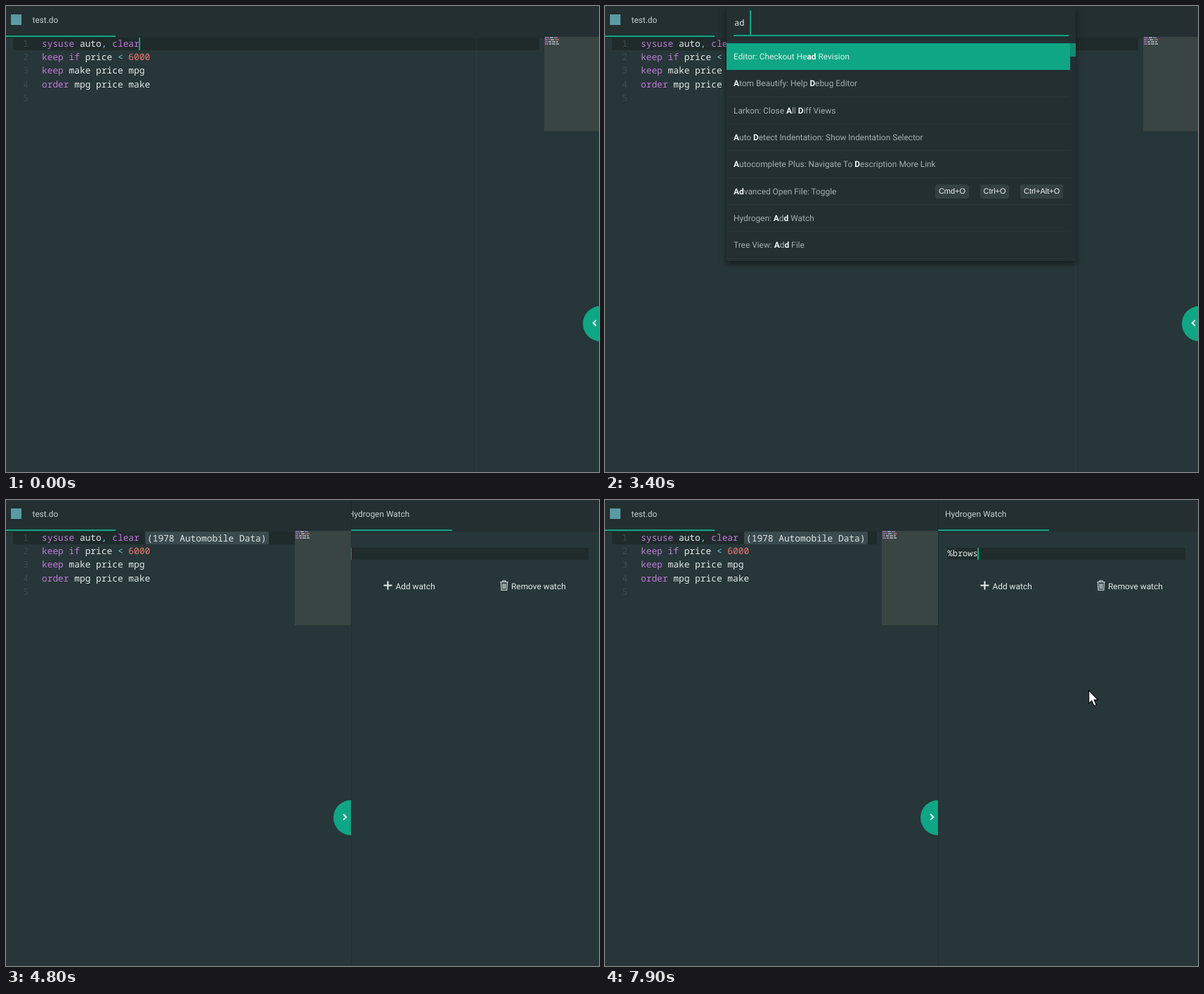
Animation, 844 px wide and 663 px high, one loop 8 s. Source, as an HTML page:

```html
<!DOCTYPE html>
<html lang="en">
<head>
<meta charset="utf-8">
<title>Editor session</title>
<style>
  :root { --bg: #273638; --bar: #232f31; --accent: #0ea685; --line: #1f2a2b; }
  html, body { margin: 0; width: 100%; height: 100%; overflow: hidden; background: var(--bg); }
  #stage { position: relative; width: 844px; height: 663px; overflow: hidden; background: var(--bg);
    font: 11.9px Roboto, sans-serif; color: #c6cfcf; text-rendering: geometricPrecision; }
  #stage div, #stage svg { position: absolute; }
  .mono { font-family: "Noto Sans Mono", monospace; font-size: 12px; white-space: pre; }
  .bar { left: 0; top: 0; width: 100%; height: 44px; background: var(--bar); box-shadow: 0 1px 2px rgba(0,0,0,.18); }
  .title { top: 0; line-height: 40px; white-space: nowrap; }
  .under { top: 42px; height: 2px; background: var(--accent); }
  .caret { width: 2px; background: var(--accent); }

  #editor { left: 0; top: 0; height: 663px; overflow: hidden; }
  #icon { left: 7px; top: 12px; width: 15px; height: 15px; background: #5a9aa3; }
  #current { left: 10px; top: 45px; height: 18px; background: var(--line); }
  #guide { left: 669px; top: 44px; width: 1px; height: 619px; background: rgba(255,255,255,.035); }
  .code { left: 51px; font-size: 12.85px; line-height: 19.2px; color: #e5ebea; }
  .num { left: 10px; width: 22px; text-align: right; font-size: 12.85px; line-height: 19.2px; color: #3c4b4e; }
  .k { color: #c07bd9; } .o { color: #62d5dc; } .n { color: #f0786b; }
  #bubble { left: 197.5px; top: 44.5px; width: 176.5px; height: 18.5px; border-radius: 2px; background: #3b4a4e;
    font-size: 12.85px; line-height: 18.5px; text-align: center; color: #e0e6e6; }
  #map { top: 44px; right: 0; width: 80px; height: 134px; background: #394543; }
  #map div { height: 2px; background: currentColor; opacity: .65; }
  #toggle { right: -25px; top: 427px; width: 50px; height: 50px; border-radius: 50%; background: var(--accent); }
  #chevron { right: 5px; top: 446px; }

  #dock { top: 0; right: 0; height: 663px; overflow: hidden; background: var(--bg); }
  #edge { left: 0; top: 0; width: 1px; height: 663px; background: rgba(0,0,0,.12); }
  #pane { top: 0; width: 370px; height: 663px; }
  #field { left: 13px; top: 67.5px; width: 339px; height: 17.5px; background: #202b2c; }
  #watch { left: 13.5px; top: 67px; line-height: 18px; color: #e5ebea; }
  #hover { left: 10px; top: 110px; width: 176px; height: 27px; background: var(--bg); box-shadow: 0 2px 4px rgba(0,0,0,.4); }
  .label { top: 113px; line-height: 20px; color: #e5ebea; white-space: nowrap; }

  #palette { left: 173px; top: 0; width: 497px; max-height: 363px; overflow: hidden; background: var(--bar); }
  #drop { left: 173px; top: 0; width: 497px; box-shadow: 0 4px 8px rgba(0,0,0,.5); }
  #stage #list { position: relative; margin-top: 53.2px; }
  #stage .row { position: relative; height: 38.3px; line-height: 38.3px; padding-left: 10px; box-sizing: border-box;
    border-bottom: 1px solid #2a3739; color: #a4afaf; white-space: nowrap; }
  .row b { color: #f3f7f7; font-weight: 700; }
  #stage .row:first-child { background: var(--accent); color: #d9f0ea; border-color: var(--accent); }
  #stage .keys { right: 10px; top: 9px; display: flex; gap: 16px; }
  .keys span { padding: 0 4.7px; height: 20px; border-radius: 2px; background: #344143; color: #edf1f1;
    font: 11px/20px "Liberation Sans", sans-serif; }
  #query { left: 11px; top: 6px; line-height: 36px; color: #e5ebea; }
  #query.all { background: #3b4b4f; }
  #thumb { right: 0; top: 53.2px; width: 8px; background: #118c72; }
</style>
</head>
<body>
<div id="stage">
  <div id="editor">
    <div class="bar"></div>
    <div id="icon"></div>
    <div class="title" style="left:37.5px">test.do</div>
    <div class="under" style="left:0;width:156px"></div>
    <div id="current"></div>
    <div id="guide"></div>
    <div id="code"></div>
    <div class="caret" id="caret" style="left:189px;top:45px;height:18px"></div>
    <div class="mono" id="bubble">(1978 Automobile Data)</div>
    <div id="map"></div>
    <div id="toggle"></div>
    <svg id="chevron" width="7" height="10" fill="none" stroke="#eaf5f2" stroke-width="2"><path/></svg>
  </div>
  <div id="dock">
    <div id="pane">
      <div class="bar"></div>
      <div class="title" style="left:10px">Hydrogen Watch</div>
      <div class="under" style="left:0;width:158px"></div>
      <div id="field"></div>
      <div class="mono" id="watch"></div>
      <div class="caret" id="watchCaret" style="top:67.5px;height:17.5px"></div>
      <div id="hover"></div>
      <svg style="left:60px;top:115px" width="13" height="13" stroke="#e8eeee" stroke-width="2"><path d="M6.5 .5v12M.5 6.5h12"/></svg>
      <div class="label" style="left:77.5px">Add watch</div>
      <svg style="left:226px;top:114px" width="12" height="15" fill="none" stroke="#dfe6e6" stroke-width="1.1">
        <path d="M.3 2.8h11.4M4 2.5V.8h4v1.7M1.5 3l.6 11.3h7.8L10.5 3M4.2 5v7.5M6 5v7.5M7.8 5v7.5"/></svg>
      <div class="label" style="left:242px">Remove watch</div>
    </div>
    <div id="edge"></div>
  </div>
  <div id="drop"></div>
  <div id="palette">
    <div class="mono" id="query"></div>
    <div class="caret" id="queryCaret" style="top:6px;height:36px"></div>
    <div style="left:10px;top:41px;width:477px;height:2px;background:var(--accent)"></div>
    <div id="list"></div>
    <div id="thumb"></div>
  </div>
  <svg id="pointer" width="18" height="27" style="overflow:visible">
    <path d="M.6.6V19.5L4.8 15.8 8 23 11.3 21.5 8.2 14.4H13.5Z" fill="#fff" stroke="#111" stroke-width="1.3" stroke-linejoin="round"/>
  </svg>
</div>
<script>
const LOOP = 8000, TICK = 100;
const $ = id => document.getElementById(id);

// Each token is a colour class and its text.
const code = [
  [['k', 'sysuse'], ['', ' auto'], ['o', ','], ['k', ' clear']],
  [['k', 'keep if'], ['', ' price '], ['o', '<'], ['n', ' 6000']],
  [['k', 'keep'], ['', ' make price mpg']],
  [['k', 'order'], ['', ' mpg price make']],
  []
];

function buildCode() {
  code.forEach((line, i) => {
    const top = 44 + i * 19.2;
    const text = line.map(([c, s]) => `<span class="${c}">${s.replace('<', '&lt;')}</span>`).join('');
    $('code').innerHTML += `<div class="mono num" style="top:${top}px">${i + 1}</div>` +
      `<div class="mono code" style="top:${top}px">${text}</div>`;
    let x = 0;
    for (const [c, s] of line) {
      for (const word of s.split(/( )/)) {
        if (word.trim()) $('map').innerHTML +=
          `<div class="${c}" style="left:${x + .5}px;top:${i * 3}px;width:${word.length}px"></div>`;
        x += word.length;
      }
    }
  });
}

// Asterisks mark matched letters; key bindings follow the bars.
const lists = {
  shut: ['Hydrogen: *Shut*down Kernel', '*S*et Syntax: *H*TML (M*u*s*t*ache)',
    'Pane: *Sh*ow Next Recently *U*sed I*t*em|Ctrl+Tab',
    'Pane: *Sh*ow Previous Recently *U*sed I*t*em|Ctrl+Shift+Tab',
    'Pane: *Sh*ow Previo*u*s I*t*em|Ctrl+Shift+Tab|Ctrl+Shift+Tab|Ctrl+Pageup',
    'Project Find: *Sh*ow In C*u*rren*t* Directory',
    'Tree View: *Sh*ow C*u*rren*t* File In File Manager',
    'Whitespace: *S*ave Wit*h*o*ut* Trailing Whitespace', ''],
  all: ['Advanced Open File: Toggle|Cmd+O|Ctrl+O|Ctrl+Alt+O', 'Application: About', 'Application: Add Project Folder',
    'Application: New File|Ctrl+N', 'Application: New Window|Ctrl+Shift+N', 'Application: Open File',
    'Application: Open Folder', 'Application: Quit|Ctrl+Q', ''],
  a: ['*A*dvanced Open File: Toggle|Cmd+O|Ctrl+O|Ctrl+Alt+O', '*A*pplication: About', '*A*pplication: Add Project Folder',
    '*A*tom Beautify: Help Debug Editor', '*A*uto Detect Indentation: Show Indentation Selector',
    '*A*utocomplete Plus: Navigate To Description More Link', 'Hydrogen: *A*dd Watch', 'Tree View: *A*dd File', ''],
  ad: ['Editor: Checkout He*ad* Revision', '*A*tom Beautify: Help *D*ebug Editor', 'Larkon: Close *A*ll *D*iff Views',
    '*A*uto *D*etect Indentation: Show Indentation Selector',
    '*A*utocomplete Plus: Navigate To *D*escription More Link',
    '*Ad*vanced Open File: Toggle|Cmd+O|Ctrl+O|Ctrl+Alt+O', 'Hydrogen: *A*d*d* Watch', 'Tree View: *A*d*d* File', ''],
  add: ['Hydrogen: *Add* Watch', 'Tree View: *Add* File', 'Tree View: *Add* Folder', 'Debugger: *Add* To Watch',
    'Application: *Add* Project Folder', 'Editor: *Add* Selection Above', 'Editor: *Add* Selection Below',
    '*A*uto *D*etect In*d*entation: Show Indentation Selector', ''],
  wa: ['Hydrogen: *Add Wa*tch', 'Debugger: *Add* To *Wa*tch',
    '*A*uto *D*etect In*d*entation: Sho*w* Indent*a*tion Selector']
};

const row = item => {
  const [name, ...keys] = item.split('|');
  return `<div class="row">${name.replace(/\*(.+?)\*/g, '<b>$1</b>')}` +
    `<div class="keys">${keys.map(k => `<span>${k}</span>`).join('')}</div></div>`;
};

// Every step changes part of the state: edge = editor's right side, pane = left of the dock's content.
const steps = [
  [0, { caret: 1, bubble: 0, fade: 0, query: '', list: 'shut', thumb: 215, type: 0, all: 0,
        edge: 846, pane: 846, gap: 87, open: 0, hover: 0, watch: '', blink: 1 }],
  [200, { caret: 0 }], [600, { caret: 1 }], [1000, { caret: 0 }], [1300, { bubble: 1 }], [1500, { caret: 1 }],
  [2000, { caret: 0, fade: .4, query: 'shut', all: 1 }], [2100, { fade: .8 }], [2200, { fade: 1 }], [2300, { type: 1 }],
  [2800, { query: '', all: 0, list: 'all', thumb: 16 }],
  [3100, { query: 'a', list: 'a', thumb: 19 }],
  [3300, { query: 'ad', list: 'ad' }], [3400, { query: 'ad ' }], [3700, { type: 0 }],
  [3900, { query: 'ad', type: 1 }], [4000, { query: 'add', list: 'add', thumb: 150 }],
  [4200, { query: 'add ' }], [4300, { query: 'add wa', list: 'wa', thumb: 0 }], [4600, { type: 0 }],
  [4700, { fade: 0, edge: 690, pane: 540, gap: 80, open: 1 }],
  [4800, { edge: 491, pane: 477 }], [4900, { edge: 474, pane: 474, gap: 87 }],
  [5200, { blink: 0 }], [5500, { blink: 1 }], [5800, { hover: 1 }], [5900, { blink: 0 }], [6100, { hover: 0 }],
  [6300, { blink: 1 }], [6700, { blink: 0 }], [6900, { watch: '%', blink: 1 }],
  [7500, { watch: '%b' }], [7600, { watch: '%bro' }], [7700, { watch: '%brow' }], [7900, { watch: '%brows' }]
];

// Pointer tip: time, x, y.
const path = [[5400, 744, 284], [5600, 694, 205], [5800, 626, 126], [5900, 619, 121], [6000, 621, 124],
  [6200, 702, 255], [6300, 688, 269], [6400, 688, 269], [6500, 688, 270], [LOOP, 688, 270]];

function pointerAt(t) {
  const i = path.findIndex(p => p[0] > t);
  if (i < 1) return null;
  const [t0, x0, y0] = path[i - 1], [t1, x1, y1] = path[i];
  const f = (t - t0) / (t1 - t0);
  return [x0 + (x1 - x0) * f, y0 + (y1 - y0) * f];
}

const show = (id, on) => { $(id).style.visibility = on ? 'visible' : 'hidden'; };
const px = (id, prop, v) => { $(id).style[prop] = v + 'px'; };

let shownList, shownTick;
function render(t) {
  const s = Object.assign({}, ...steps.filter(p => p[0] <= t).map(p => p[1]));
  px('editor', 'width', s.edge);
  px('current', 'width', s.edge - s.gap - 10);
  px('dock', 'left', s.edge);
  px('pane', 'left', s.pane - s.edge);
  show('dock', s.open);
  show('caret', s.caret);
  show('bubble', s.bubble);
  $('chevron').firstChild.setAttribute('d', s.open ? 'M1.2 1l4 4-4 4' : 'M5.8 1l-4 4 4 4');

  $('hover').style.opacity = s.hover;
  $('watch').textContent = s.watch;
  px('watchCaret', 'left', 13 + s.watch.length * 7.2);
  $('watchCaret').style.opacity = s.blink;

  if (shownList !== s.list) {
    $('list').innerHTML = lists[s.list].map(row).join('');
    shownList = s.list;
  }
  $('palette').style.opacity = $('drop').style.opacity = s.fade;
  $('query').textContent = s.query;
  $('query').className = s.all ? 'mono all' : 'mono';
  px('queryCaret', 'left', 11.2 + s.query.length * 7.2);
  $('queryCaret').style.opacity = s.type;
  px('thumb', 'height', s.thumb);
  px('list', 'width', s.thumb ? 489 : 497);
  px('drop', 'height', s.thumb ? 363 : 167);
  px('palette', 'height', s.thumb ? 363 : 167);

  const tip = pointerAt(t);
  show('pointer', tip);
  if (tip) $('pointer').style.transform = `translate(${tip[0]}px, ${tip[1]}px)`;
}

buildCode();
const start = performance.now();
function loop() {
  const t = Math.floor((performance.now() - start) % LOOP / TICK) * TICK;
  if (t !== shownTick) render(shownTick = t);
  requestAnimationFrame(loop);
}
loop();
</script>
</body>
</html>
```
